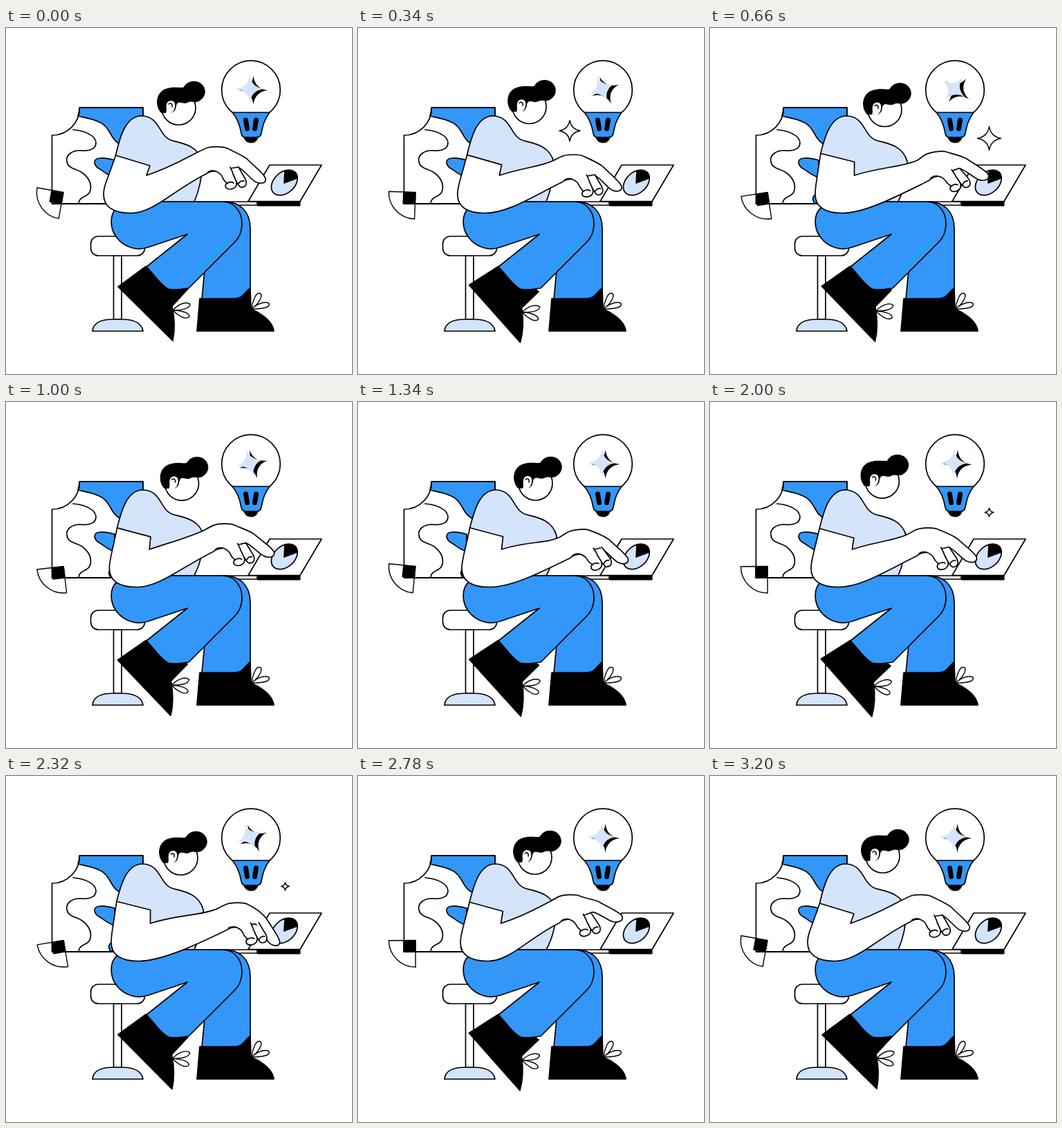
An HTML page for the animation above (3.22 s loop, 500 by 500 pixels).

```html
<!DOCTYPE html>
<html lang="en">
<head>
<meta charset="utf-8">
<title>Working at a laptop</title>
<style>
  html, body { margin: 0; width: 100%; height: 100%; overflow: hidden; background: #fff; }
  svg { display: block; width: 100vw; height: 100vh; }
  .line { fill: none; stroke: #000; stroke-width: 1.7; stroke-linejoin: round; stroke-linecap: round; }
  .thin { stroke-width: 1.4; }
  .white { fill: #fff; }
  .blue { fill: #3396f9; }
  .pale { fill: #d3e4fb; }
  .black { fill: #000; }
</style>
</head>
<body>
<svg viewBox="0 0 500 500" class="line">
  <!-- board -->
  <path class="blue" d="M106 115H198V170H172C150 167 153 143 135 136C125 131 114 130 104 127Q106 121 106 115Z"/>
  <path class="blue" d="M128 194C128 186 142 187 157 191V216C146 213 140 206 134 203Q128 199 128 194Z"/>
  <path class="blue" d="M151 253C146 246 149 239 162 238V253Z"/>
  <path d="M97 147C114 148 130 156 130 166C130 177 116 178 107 177C96 177 86 183 88 193C90 204 102 203 110 209C118 215 124 224 122 234C120 245 106 242 105 253"/>
  <path d="M66.5 253V155A40 40 0 0 0 106.500 115H198V253"/>
  <path d="M66.500 254H200" stroke-width="2"/>
  <g id="sector">
    <path class="thin" d="M83 237.500H44.500A38.500 38.500 0 0 0 83 276Z"/>
    <path class="black" d="M66 238H83V254H66Z"/>
  </g>

  <!-- desk and laptop -->
  <path class="white" d="M190 251H363V256H190Z"/>
  <path class="black" d="M364 251H425V257H364Z" stroke-width="1"/>
  <path class="white" d="M381 198H456L425 250.500H350Z"/>
  <ellipse class="pale" cx="402.300" cy="223.500" rx="21.500" ry="15" transform="rotate(-42 402.300 223.500)"/>
  <path class="black" d="M402 224L403 207C411 204 421 206 421 217Z"/>

  <!-- bulb -->
  <circle class="white" cx="354" cy="89.500" r="42.300"/>
  <path class="black" d="M344 157H364Q362 165.500 354 165.500Q346 165 344 157Z"/>
  <path class="blue" d="M327 122H381C373 132 371 142 369 152Q368 158 362 158H346Q341 158 340 152C338 141 335 131 327 122Z"/>
  <path d="M346.500 133L348.500 145.500M361.500 133L359.500 145.500" stroke-width="7"/>
  <path id="shade" class="black" stroke="none"/>
  <path id="glow" class="pale" stroke="none"/>
  <path id="spark" class="white thin"/>

  <!-- stool -->
  <path class="white" d="M155.500 329H167V421H155.500Z"/>
  <path class="pale" d="M125 438C126 426 138 421 155 421H167C184 421 196 426 198 438Z"/>
  <rect class="white" x="122.500" y="301" width="78" height="28" rx="11"/>

  <path id="torso" class="pale"/>

  <!-- legs -->
  <path class="blue" d="M312 251C338 250 353 265 353 290V392H283L288 340Z"/>
  <path class="black" d="M353 376C345 380 344 391 330 391H280L276 438H387C386 427 375 415 354 406Z"/>
  <g class="thin">
    <path class="white" d="M355 406C356 396 361 381 367 383.500C373 386 364 400 355 406Z"/>
    <path class="white" d="M355 406C364 397 378 394 380.500 399C381 405 366 406 355 406Z"/>
  </g>
  <g id="boot">
    <path class="black" d="M162 374L202 344.500L216 346L244 366L263 377L240 402C244 420 244 438 241 452Z"/>
    <g class="thin">
      <path class="white" d="M241 408C250 398 261 395 266 399C266 406 252 408 241 408Z"/>
      <path class="white" d="M241 408C252 408 265 411 265 417C260 423 248 415 241 408Z"/>
    </g>
  </g>
  <path class="blue" d="M160 260C149 270 150 290 160 303C172 318 190 322 205 317L262 298L203 345C214 356 222 370 234 377C244 380 255 377 264 376L330 310C345 295 344 270 331 258Q324 251 312 251H170Z"/>

  <!-- arm -->
  <path id="arm" class="white"/>
  <g id="curl" class="white">
    <path d="M14 29C22 24 32 30 35 37C36 41 39 43 41 45C37 50 40 54 46 54C54 53 57 48 54 40L46 22"/>
    <path d="M50 32C54 40 56 48 61 51C69 52 72 45 66 36L58 22"/>
    <path d="M41 46Q46 42 51 45M58 46Q61 41 66 42" fill="none"/>
  </g>

  <g id="head">
    <circle class="white" cx="249.500" cy="115.500" r="24.500"/>
    <path class="black" d="M224 122C215 112 217 92 232 88C244 84 252 88 257 86C261 77 273 75 281 80C290 87 289 99 280 104.500C274 109 268 104 263 107C256 111 251 104 247 109C244 113 247 118 240 122Z" stroke-width="1"/>
    <path d="M231 123C233 118 231 115 232 111C233 104 242 103 244 109C245 114 243 120 239 123Z" class="white" stroke="none"/>
    <path d="M235 110C238 107 241 110 240 114" class="thin"/>
  </g>
</svg>

<script>
const LOOP = 3220, CYCLE = 1600, STEP = 20;
const $ = id => document.getElementById(id);

// phase, head x, head y, elbow x, wrist x, wrist y, hand turn, finger turn
const POSES = [
  [0, 0, 0, 141, 278, 179, 0, 0],
  [60, -6, -4, 137, 278, 190, 7, 2],
  [660, 3, 2.5, 152, 300, 191, -10, 0],
  [720, 3, 3, 152, 307, 191, -1, 15],
  [1180, 6, 2, 148, 278, 181, -4, -11],
  [1340, 7, 2, 150, 292, 195, -7, 6]
];

function key(i) {
  const n = POSES.length, k = POSES[(i + n) % n].slice();
  k[0] += Math.floor(i / n) * CYCLE;
  return k;
}

// Smooth slope that never overshoots a pose
function slope(a, b, c, j) {
  const s = (b[j] - a[j]) / (b[0] - a[0]), q = (c[j] - b[j]) / (c[0] - b[0]);
  return s * q > 0 ? 2 * s * q / (s + q) : 0;
}

function poseAt(p) {
  let i = POSES.length - 1;
  while (POSES[i][0] > p) i--;
  const [a, b, c, d] = [key(i - 1), key(i), key(i + 1), key(i + 2)];
  const w = c[0] - b[0], u = (p - b[0]) / w, v = 1 - u;
  return b.slice(1).map((x, k) => {
    const j = k + 1;
    return x * (1 + 2 * u) * v * v + c[j] * u * u * (3 - 2 * u)
      + w * u * v * (slope(a, b, c, j) * v - slope(b, c, d, j) * u);
  });
}

function turn(x, y, deg, cx = 0, cy = 0) {
  const a = deg * Math.PI / 180, dx = x - cx, dy = y - cy;
  return [cx + dx * Math.cos(a) - dy * Math.sin(a), cy + dx * Math.sin(a) + dy * Math.cos(a)];
}

function star(r, pinch) {
  const a = r * pinch;
  return `M0 ${-r}Q${a} ${-a} ${r} 0Q${a} ${a} 0 ${r}Q${-a} ${a} ${-r} 0Q${-a} ${-a} 0 ${-r}Z`;
}

function drawBody(p) {
  const [hx, hy, ex, wx, wy, hand, finger] = poseAt(p);
  const d = hx * 0.45, swing = ex - 141;
  const hemL = [158.500 + d, 184 - swing * 0.25];
  const hemR = [208 + d * 0.5, 199 - swing * 0.5];
  const crease = [203 + swing * 0.5, 213];

  const at = (x, y) => {
    const [a, b] = turn(x, y, hand);
    return (wx + a).toFixed(2) + ' ' + (wy + b).toFixed(2);
  };
  const tip = (x, y) => at(...turn(x, y, finger, 47, 9));
  const [hlx, hly] = turn(11, 32, hand).map((n, i) => n + (i ? wy : wx));

  $('arm').setAttribute('d',
    `M${hemL}C${hemL[0] * 0.35 + ex * 0.65} 218 ${ex} 228 ${ex} 240` +
    `C${ex} 258 ${ex + 12} 267.500 ${ex + 40} 267.500` +
    `C${ex + 72} 267.500 ${hlx - 45} ${hly + 22} ${hlx} ${hly}` +
    `Q${at(16, 28)} ${at(24, 28)}L${at(46, 24)}` +
    `L${tip(57, 22)}C${tip(64, 24)} ${tip(74, 38)} ${tip(82, 43)}` +
    `C${tip(89, 47)} ${tip(99, 46)} ${tip(97, 38)}` +
    `C${tip(94, 31)} ${tip(82, 22)} ${tip(70, 10)}` +
    `C${tip(62, 4)} ${at(52, 0)} ${at(42, -5)}` +
    `C${at(36, -8)} ${at(20, -8)} ${at(13, -6)}Q${at(8, -4)} ${wx} ${wy}` +
    `C${wx - 20} ${wy + 10} ${crease[0] + 36} ${crease[1] - 12} ${crease}L${hemR}Z`);

  $('curl').setAttribute('transform', `translate(${wx} ${wy}) rotate(${hand})`);

  const x = n => n + d;
  $('torso').setAttribute('d',
    `M${hemL}C${x(164)} 160 ${x(172)} 127 ${x(196)} 127` +
    `C${x(224)} 128 ${x(220)} 158 ${x(241)} 163` +
    `C${x(258)} 167 ${x(278)} 171 ${x(284)} 194` +
    `Q${x(283)} 226 272 251H180L${crease}Z`);

  $('head').setAttribute('transform', `translate(${hx} ${hy})`);
}

function drawSpark(p) {
  const first = p < 390;
  const u = Math.abs(p - (first ? 222 : 559)) / 178;
  const r = u < 1 ? 20 * (1 - u ** 3.4) : 0;
  const el = $('spark');
  el.style.display = r > 0.5 ? '' : 'none';
  el.setAttribute('d', star(r, 0.14));
  el.setAttribute('transform', first ? 'translate(306 148.500)' : 'translate(403.500 159.500)');
}

function draw(t) {
  const p = t % CYCLE;
  const wave = (period, lag) => Math.cos(2 * Math.PI * (p - lag) / period);
  drawBody(p);
  drawSpark(p);
  $('sector').setAttribute('transform', `rotate(${10 * wave(CYCLE, -10)} 83 237)`);
  $('boot').setAttribute('transform', `rotate(${2 * (1 - wave(800, 20))} 200 350)`);

  const u = Math.min(1, Math.max(0, (p - 20) / 1130));
  const spin = 180 * (1 - Math.cos(Math.PI * u));
  $('shade').setAttribute('transform', `translate(357.500 90) rotate(${spin})`);
  $('glow').setAttribute('transform', `translate(352.500 88) rotate(${spin})`);
}

$('shade').setAttribute('d', star(21, 0.1));
$('glow').setAttribute('d', star(21, 0.08));

const start = performance.now();
function tick() {
  const t = (performance.now() - start) % LOOP;
  draw(Math.floor(t / STEP) * STEP);
  requestAnimationFrame(tick);
}
tick();
</script>
</body>
</html>
```
